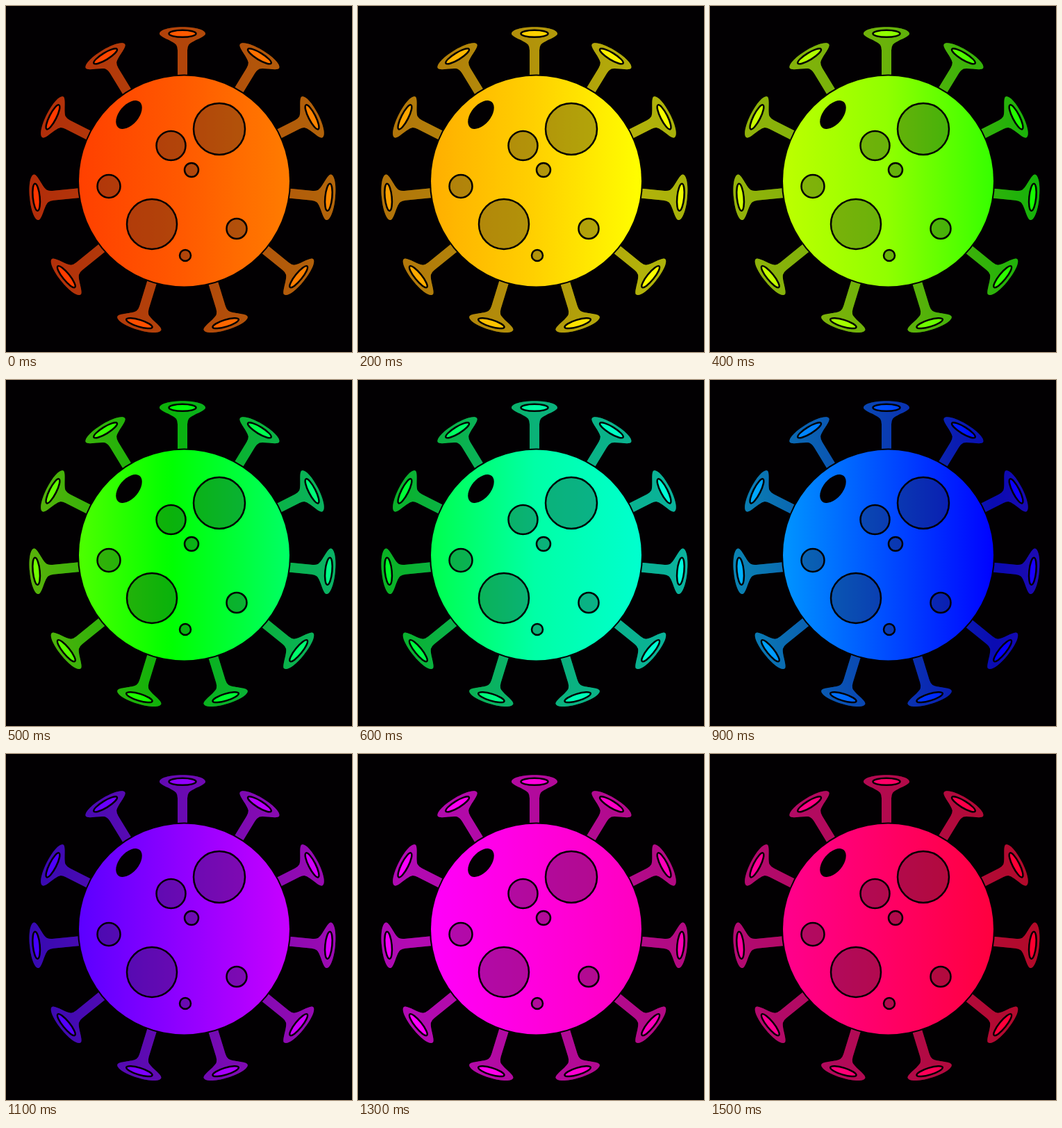
An HTML page with a canvas that plays this animation: 498 px wide and 498 px high, repeating every 1600 ms.

```html
<!DOCTYPE html>
<html>
<head>
<meta charset="utf-8">
<style>
html, body { margin: 0; width: 100%; height: 100%; overflow: hidden; background: #020002; }
canvas { display: block; }
</style>
</head>
<body>
<canvas id="stage" width="498" height="498"></canvas>
<script>
const ctx = document.getElementById('stage').getContext('2d');
const LOOP = 1600, STEP = 100;
const MID = 254, MS_PER_PX = 0.38;
const INK = '#020002', SHADE = 'rgba(30,30,30,.34)';

// key hues, evenly spaced in time from -HUE_GAP on
const HUE_GAP = 200;
const HUES = [0, 21, 49, 86, 159, 192, 252, 296, 320, 352];

// [x, y, radius]
const CRATERS = [
  [307, 177, 37], [237.5, 201, 21], [267, 236, 10], [148, 259.5, 16.5],
  [210, 314, 36], [332, 320.5, 14.5], [258, 359, 8]
];

const spikeShape = new Path2D(
  'M-33 0C-33-5-20-9.5 0-9.5S33-5 33 0C33 5 14 10 9 16Q7 19 7 24V75H-7V24Q-7 19-9 16C-14 10-33 5-33 0Z');

function ellipse(x, y, rx, ry = rx, angle = 0) {
  const p = new Path2D();
  p.ellipse(x, y, rx, ry, angle, 0, Math.PI * 2);
  return p;
}

function place(path, x, y, angle) {
  const p = new Path2D();
  p.addPath(path, new DOMMatrix().translate(x, y).rotate(angle * 180 / Math.PI));
  return p;
}

const lip = ellipse(0, 0, 19.5, 5);

// eleven spikes on a slightly uneven ring, mirrored left and right
const spikes = Array.from({ length: 11 }, (_, i) => {
  const k = i - 5, side = Math.sign(k);
  const even = Math.abs(k) * Math.PI * 2 / 11;
  const a = even - 0.045 * Math.sin(even);
  const r = 212 + 3 * Math.cos(3 * a - 0.5);
  const at = [MID + side * r * Math.sin(a), 254.5 - r * Math.cos(a), side * a];
  return { body: place(spikeShape, ...at), lip: place(lip, ...at) };
});
const craters = CRATERS.map(c => ellipse(...c));
const ball = ellipse(256.5, 252, 151.5);
const hole = ellipse(177, 156.5, 24, 14, -50 * Math.PI / 180);

function hueAt(t) {
  const p = t / HUE_GAP + 1, i = Math.floor(p);
  return HUES[i] + (HUES[i + 1] - HUES[i]) * (p - i);
}

// the same hue run serves across the stage and over time
function rainbow(t) {
  const x0 = 30, x1 = 478, n = 32;
  const g = ctx.createLinearGradient(x0, 0, x1, 0);
  for (let i = 0; i <= n; i++) {
    const x = x0 + (x1 - x0) * i / n;
    g.addColorStop(i / n, `hsl(${hueAt(t + (x - MID) * MS_PER_PX)} 100% 50%)`);
  }
  return g;
}

function fill(path, style) {
  ctx.fillStyle = style;
  ctx.fill(path);
}

function outline(path, width) {
  ctx.strokeStyle = INK;
  ctx.lineWidth = width;
  ctx.stroke(path);
}

function draw(t) {
  const paint = rainbow(t);
  ctx.fillStyle = INK;
  ctx.fillRect(0, 0, 498, 498);
  for (const s of spikes) {
    fill(s.body, paint);
    fill(s.body, SHADE);
    fill(s.lip, paint);
    outline(s.lip, 2.5);
  }
  outline(ball, 4);
  fill(ball, paint);
  for (const c of craters) {
    fill(c, SHADE);
    outline(c, 2.5);
  }
  fill(hole, INK);
}

const start = performance.now();
let shown = -1;
function tick(now) {
  const t = Math.floor(Math.max(0, now - start) % LOOP / STEP) * STEP;
  if (t !== shown) draw(shown = t);
  requestAnimationFrame(tick);
}
tick(start);
</script>
</body>
</html>
```
